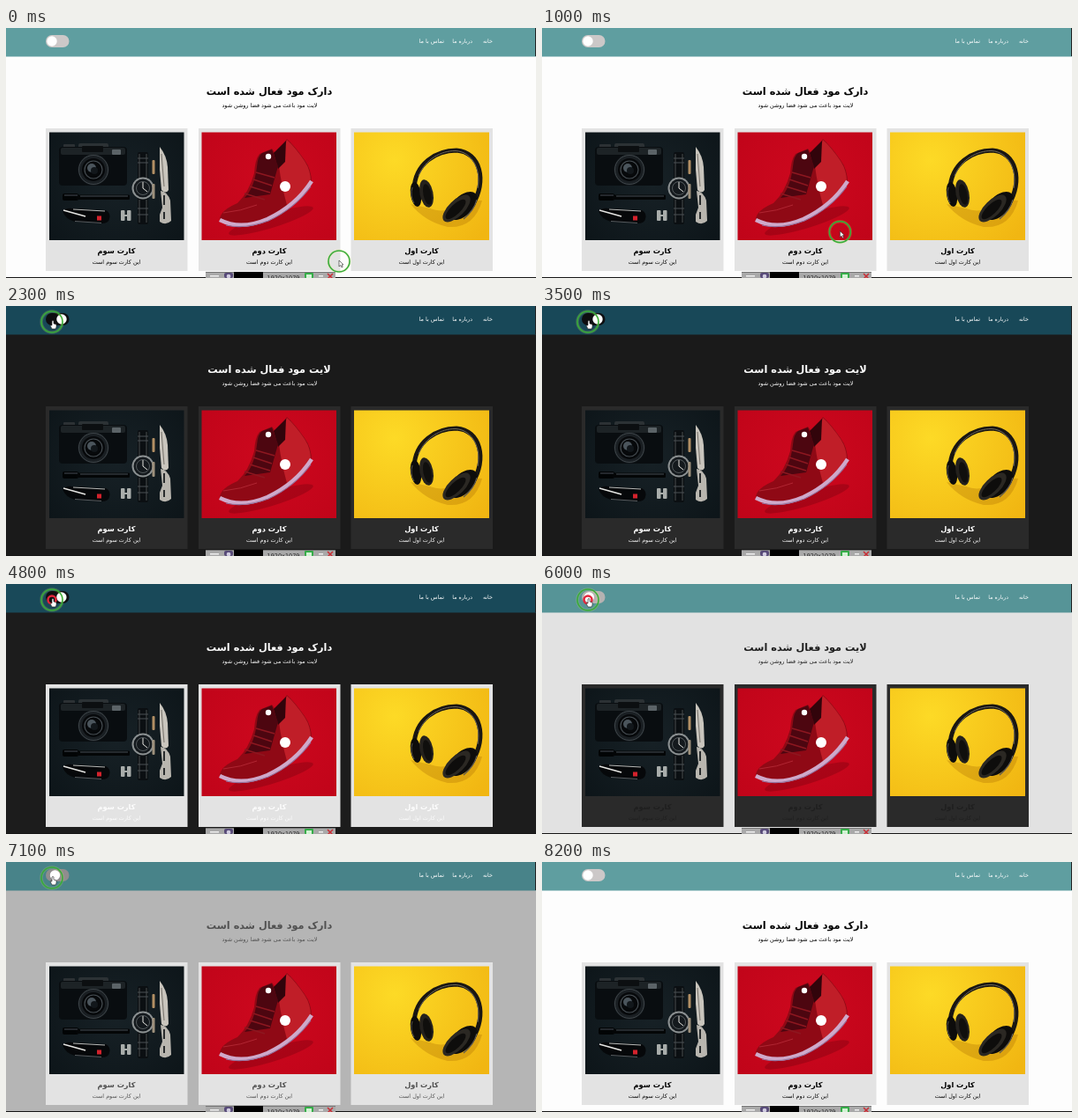
Write an HTML page with a canvas that moves like this. It is 600 by 284 pixels and loops after 8300 ms.

```html
<!DOCTYPE html>
<html lang="fa">
<head>
<meta charset="utf-8">
<style>
html, body { margin: 0; overflow: hidden; background: #fff; }
canvas { display: block; }
</style>
</head>
<body>
<canvas id="stage" width="600" height="284"></canvas>
<script>
const ctx = document.getElementById('stage').getContext('2d');
const LOOP = 8300, STEP = 100, FADE = 500;
const CLICKS = [1825, 4790, 5942, 6900];
const CURSOR = [
  [0, 377, 265], [300, 377, 265], [900, 362, 249], [1500, 29, 15],
  [1750, 52, 18], [7450, 52, 18], [8000, 390, 302], [LOOP, 390, 302]
];

// CSS "ease": cubic-bezier(.25, .1, .25, 1)
function ease(x) {
  if (x <= 0 || x >= 1) return x <= 0 ? 0 : 1;
  const bez = (s, a, b) => 3 * s * (1 - s) * (1 - s) * a + 3 * s * s * (1 - s) * b + s ** 3;
  let lo = 0, hi = 1;
  for (let i = 0; i < 20; i++) {
    const mid = (lo + hi) / 2;
    if (bez(mid, .25, .25) < x) lo = mid; else hi = mid;
  }
  return bez(lo, .1, 1);
}

const blend = (a, b, k) => `rgb(${a.map((v, i) => Math.round(v + (b[i] - v) * k))})`;

function rect(x, y, w, h, fill, r = 0) {
  ctx.fillStyle = fill;
  ctx.beginPath();
  ctx.roundRect(x, y, w, h, r);
  ctx.fill();
}

function oval(x, y, rx, ry, fill, angle = 0) {
  ctx.fillStyle = fill;
  ctx.beginPath();
  ctx.ellipse(x, y, rx, ry, angle, 0, 7);
  ctx.fill();
}

const disc = (x, y, r, fill) => oval(x, y, r, r, fill);

function shape(d, fill) {
  ctx.fillStyle = fill;
  ctx.fill(new Path2D(d));
}

function line(d, color, width) {
  ctx.strokeStyle = color;
  ctx.lineWidth = width;
  ctx.stroke(new Path2D(d));
}

function ring(x, y, r, color, width) {
  ctx.strokeStyle = color;
  ctx.lineWidth = width;
  ctx.beginPath();
  ctx.arc(x, y, r, 0, 7);
  ctx.stroke();
}

function text(str, x, y, size, color, { bold = false, align = 'center' } = {}) {
  ctx.font = `${bold ? 'bold ' : ''}${size}px "DejaVu Sans", sans-serif`;
  ctx.direction = 'rtl';
  ctx.textAlign = align;
  ctx.fillStyle = color;
  ctx.fillText(str, x, y);
}

function glow(x, y, r, inner, outer) {
  const g = ctx.createRadialGradient(x, y, 0, x, y, r);
  g.addColorStop(0, inner);
  g.addColorStop(1, outer);
  return g;
}

function gadgets() {
  rect(49, 118.5, 152.5, 122.5, glow(125, 175, 100, '#172126', '#0d1519'));
  // camera
  rect(82, 131, 34, 8, '#2c3235', 2);
  rect(65, 132, 13, 5, '#2c3134', 1);
  rect(60, 135, 77, 44, '#090d10', 4);
  rect(62, 136, 73, 8, '#1d2326', 2);
  rect(86, 134, 24, 7, '#0c0f11', 1);
  rect(120, 138, 10, 6, '#5b6367', 1);
  disc(99, 161, 17.5, '#1a1f23');
  ring(99, 161, 16.5, '#3d4448', 1);
  disc(99, 161, 13, '#07090b');
  ring(99, 161, 10, '#464d52', 1.2);
  disc(97, 159, 5, '#4b555c');
  disc(100, 162, 4, '#12171b');
  // flashlight
  rect(64, 188, 18, 8, '#020405', 2);
  rect(80, 189.5, 60, 5.5, '#040607', 1);
  line('M66 190H81M84 191H138', '#59616a', .8);
  // folding knife and corkscrew
  shape('M64 208Q68 204 75 205L113 207Q119 210 117 217Q116 222 108 222L78 220Q67 217 64 208Z', '#06080a');
  line('M65 207L90 214', '#e5e5e2', 1.6);
  line('M76 206L112 208', '#b9bbb9', 1);
  line('M78 219.5L108 221.5', '#6c7275', .8);
  rect(103, 213.5, 5, 5, '#d4222c');
  rect(130, 207, 4.5, 12, '#a9adab', 1);
  rect(137, 207, 4.5, 12, '#a9adab', 1);
  line('M134 213H138', '#a9adab', 2);
  // watch
  rect(149, 141, 12, 82, '#0b0f12', 2);
  line('M151 143V172M159 143V172M151 195V221M159 195V221', '#656a6c', .7);
  line('M149 148H161M149 153H161M149 205H161M149 212H161', '#4a5054', 1);
  disc(155, 182, 12.5, '#8c9192');
  disc(155, 182, 10.5, '#14191d');
  ring(155, 182, 7.5, '#656b6e', .8);
  line('M155 175V182L160 186', '#e4e4df', 1);
  // pen and long knife
  rect(165.5, 150, 3, 16, '#b28f64', 1);
  rect(165.5, 177, 3, 17, '#9d907c', 1);
  shape('M174 135Q182 145 183 158L184 184Q181 189 176 184L174 161Z', '#c9c5bd');
  line('M176 143L179 180', '#77726b', 1);
  shape('M175 185Q183 186 186 196L187 219Q181 225 174 220V212L177 204Z', '#b9b6af');
  line('M179 190V201M179 209V217', '#292c2d', 2);
}

function sneaker() {
  rect(221.5, 118.5, 152.5, 122.5, glow(300, 172, 105, '#cd081e', '#c00419'));
  oval(300, 219, 50, 8, 'rgba(100,0,10,.3)', -.3);
  shape('M242 217Q243 207 262 199Q275 187 281 165Q282 149 287 143L301 137L306 144L318 126Q326 133 338 150Q346 161 346 176Q330 200 298 217Q268 229 242 217Z', '#8f0915');
  shape('M309 157L318 127Q327 135 338 151Q345 162 345 174Q335 190 318 201Q312 180 309 157Z', '#c01e28');
  shape('M303 142L317 128L316 152L308 160Z', '#32040b');
  shape('M284 158Q285 145 290 142L301 138L308 157L299 189L270 193Q281 182 284 158Z', '#4d0610');
  line('M283 164L304 170M280 172L301 179M276 180L299 187M270 188L293 195', '#8d1720', 1.5);
  line('M246 210Q266 208 284 201', '#b52a36', .9);
  line('M242 218Q266 230 296 217Q328 202 346 174', '#cfa9ca', 4.5);
  line('M249 224Q270 229 297 219Q327 205 345 180', '#94739f', 1.2);
  // plain discs on the tongue and side
  disc(297, 146, 3.2, '#fff');
  disc(316, 180, 6, '#fff');
}

function headphones() {
  rect(394, 118.5, 153, 122.5, glow(440, 150, 130, '#fdda26', '#f1b612'));
  shape('M458 200Q474 220 500 226Q530 228 539 196L519 195Q500 213 480 205Z', 'rgba(165,105,0,.3)');
  line('M462 183C463 154 487 139 510 139C537 141 545 174 528 201', '#191612', 5);
  line('M467 168C475 149 492 139.5 509 139.5C529 141 538 162 534 182', '#6b665a', 1);
  oval(464, 189, 6, 14, '#0d0c0b', -.15);
  oval(476, 188, 7.5, 16, '#24211d', -.2);
  oval(477, 189, 4.5, 12, '#100f0d', -.2);
  oval(517, 202, 11, 20, '#0d0c0b', .8);
  oval(510, 205, 9, 20, '#2b2823', .8);
  oval(509, 206, 5.5, 15, '#0e0d0c', .8);
  line('M518 217Q530 207 533 195', '#5b5750', 1.2);
  line('M460 181Q457 190 462 199', '#57534c', 1);
}

const CARDS = [
  [45, 'سوم', gadgets], [218, 'دوم', sneaker], [390.5, 'اول', headphones]
];

function recorderBar() {
  rect(226, 277, 147, 7, '#a9a9a9');
  rect(226, 277, 147, 1, '#777');
  rect(231, 281, 10, 1.5, '#eee');
  rect(247, 278, 10, 6, '#574a78', 2);
  disc(252, 282, 2.3, '#d0cce0');
  rect(258, 277, 33, 7, '#000');
  text('1920x1079', 314, 286, 6.5, '#222');
  rect(338, 278, 10, 6, '#35ad48', 1);
  rect(340, 280, 6, 4, '#d2f2d3');
  rect(354, 281, 5, 1.5, '#eee');
  line('M364 279L370 285M370 279L364 285', '#c92e35', 1.5);
}

function cursorAt(t) {
  const i = CURSOR.findIndex(k => k[0] > t);
  const [t0, x0, y0] = CURSOR[i - 1], [t1, x1, y1] = CURSOR[i];
  const k = (t - t0) / (t1 - t0), s = k * k * (3 - 2 * k);
  return [x0 + (x1 - x0) * s, y0 + (y1 - y0) * s];
}

function pointer(t) {
  const [x, y] = cursorAt(t);
  ring(x, y, 12, 'rgba(225,240,100,.18)', 3.5);
  ring(x, y, 12, '#38ab3a', 1.6);
  if (CLICKS.some(c => Math.abs(t - c) < 130)) ring(x, y, 4.5, '#e3263b', 2.5);
  const overToggle = x > 40 && x < 72 && y < 26;
  ctx.save();
  ctx.translate(x, y - 1);
  const d = overToggle
    ? 'M0 0Q1 -1 2 0V3L5 4V7L4 9H0L-2 5L0 5Z'
    : 'M0 0V7L1.7 5.5L3 8L4.2 7.4L3 5L5 4.8Z';
  shape(d, '#fff');
  line(d, '#222', .6);
  ctx.restore();
}

function draw(t) {
  const count = CLICKS.filter(c => c <= t).length;
  const dark = count % 2 === 1;
  const k = count ? ease((t - CLICKS[count - 1]) / FADE) : 1;
  const night = dark ? k : 1 - k;
  const ink = blend([0, 0, 0], [255, 255, 255], night);

  rect(0, 0, 600, 284, blend([253, 253, 253], [26, 26, 26], night));
  rect(0, 0, 600, 32.4, blend([95, 158, 160], [24, 72, 88], night));
  rect(599, 0, 1, 32, '#222');
  text('خانه', 551, 17, 6.4, '#fff', { align: 'right' });
  text('درباره ما', 528, 17, 6.2, '#fff', { align: 'right' });
  text('تماس با ما', 496, 17, 6.4, '#fff', { align: 'right' });

  rect(45, 8, 26.5, 14, blend([204, 200, 200], [14, 14, 16], night), 7);
  disc(52 + 11 * night, 15, 5.7, '#fff');

  text(`${dark ? 'لایت' : 'دارک'} مود فعال شده است`, 298, 76, 11.3, ink, { bold: true });
  text('لایت مود باعث می شود فضا روشن شود', 298.5, 90, 6.4, ink);

  for (const [x, name, photo] of CARDS) {
    rect(x, 114, 160.5, 162, dark ? '#2a2a2a' : '#e3e3e3');
    photo();
    text(`کارت ${name}`, x + 80, 255.5, 8.2, ink, { bold: true });
    text(`این کارت ${name} است`, x + 80, 268, 6.4, ink);
  }

  rect(0, 283, 600, 1, '#151515');
  recorderBar();
  pointer(t);
}

function frame(now) {
  draw(Math.floor((now % LOOP) / STEP) * STEP);
  requestAnimationFrame(frame);
}
requestAnimationFrame(frame);
</script>
</body>
</html>
```
